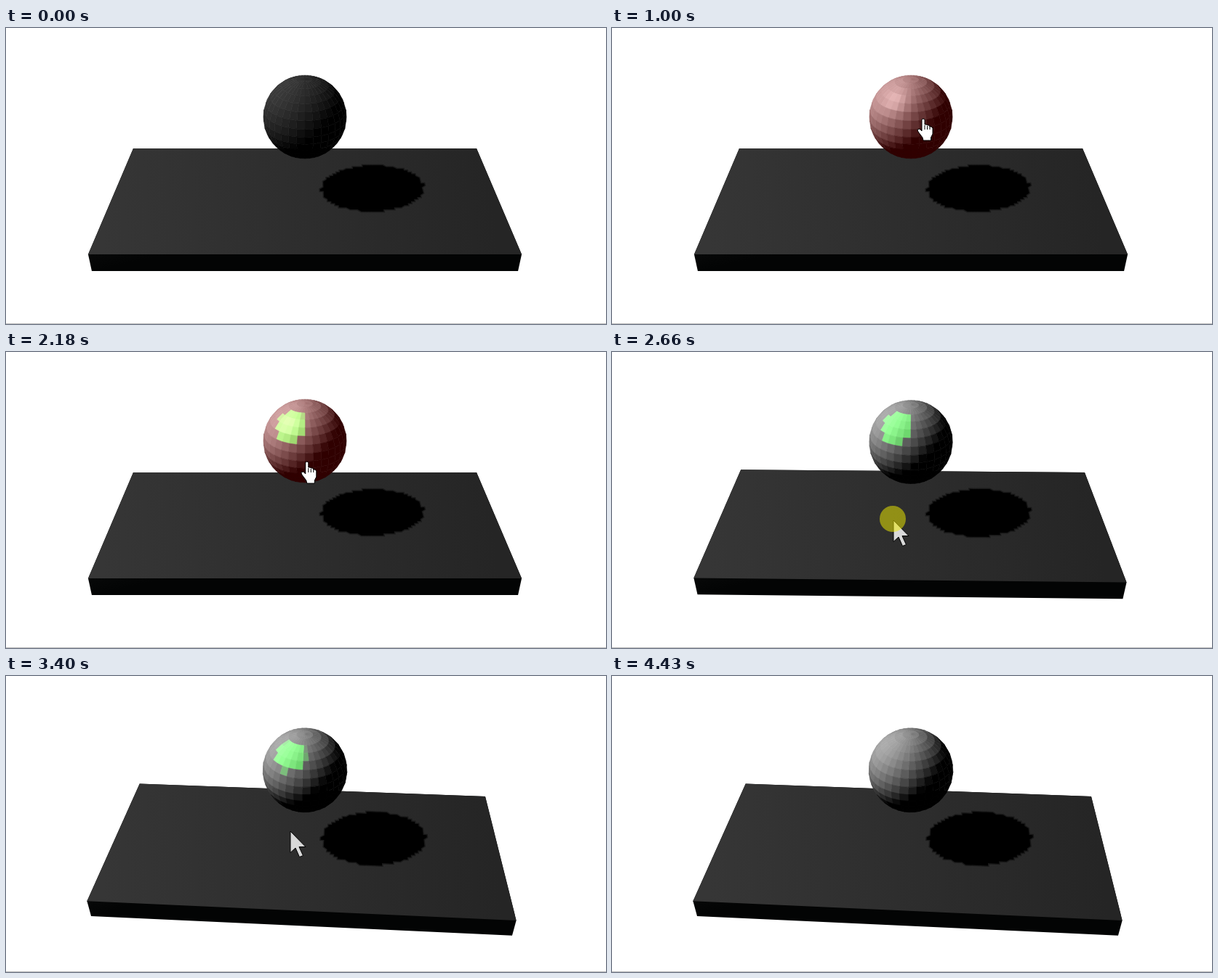
Write an HTML page with a canvas that moves like this. It is 825x408 px and loops after 4.97 s.

```html
<!DOCTYPE html>
<html lang="en">
<head>
<meta charset="utf-8">
<title>Sphere and slab</title>
<style>
  html, body { margin: 0; width: 100%; height: 100%; overflow: hidden; background: #fff; }
  canvas { display: block; }
</style>
</head>
<body>
<canvas id="stage" width="825" height="408"></canvas>
<script>
const ctx = document.getElementById('stage').getContext('2d');
const LOOP = 4970, RAD = Math.PI / 180;

// Scene, in units of one pixel at the view plane; the origin is the slab's centre
const slab = { x: 268.3, y: 13.5, z: 131.3 };
const ball = { y: 136.5, r: 54.1 };
const light = unit([-.612, .78, .129]);
const camera = { x: 411, y: 203.5, dist: 938, drop: 38.9, back: 24.6, pitch: 32.3 };

// Script of the pointer: it appears, hovers, clicks, drags the view and leaves
const ENTER = 520, FIRST_OUT = 1240, CLICK = 1860, CLICK_END = 2040;
const DRAG = 2660, RELEASE = 3310, SECOND_OVER = 3500, LEAVE = 4430;
const grab = { x: 390.4, y: 227.4, gain: .26 };
const path = [
  [ENTER, 66, 156], [1000, 428, 125], [FIRST_OUT, 428, 125], [1480, 328, 249], [1720, 415, 133],
  [CLICK_END, 415, 135], [2280, 411, 189], [2520, 396, 217], [DRAG, 387, 232],
  [2985, 351, 257.7], [RELEASE, 376.5, 249], [3390, 391, 214], [3710, 405, 150],
  [4260, 679, 349], [4370, 678, 384]
];

// The picture only changes in steps inside these spans
const spans = [
  [520, 1000], [1240, 1720], [1820, 2280], [2350, 2520],
  [2660, 3160], [3230, 3710], [3780, 4260], [4370, 4430]
];

function stepTime(t) {
  const span = spans.filter(s => t >= s[0]).pop();
  if (!span) return 0;
  const [a, b] = span, count = Math.round((b - a) / 82), step = (b - a) / count;
  return a + step * Math.min(count, Math.floor((t - a) / step + .25));
}

function pointerAt(q) {
  const i = path.findIndex(k => k[0] >= q);
  if (i < 1) return path[i < 0 ? path.length - 1 : 0].slice(1);
  const [t0, x0, y0] = path[i - 1], [t1, x1, y1] = path[i];
  const u = (q - t0) / (t1 - t0), e = u * u * (3 - 2 * u);
  return [x0 + (x1 - x0) * e, y0 + (y1 - y0) * e];
}

function dot(a, b) { return a[0] * b[0] + a[1] * b[1] + a[2] * b[2]; }
function unit(v) { return v.map(c => c / Math.hypot(...v)); }

// Orbit view: turn() rotates a direction, place() moves a point into view space
function makeView(q) {
  let yaw = 0, pitch = camera.pitch;
  if (q >= DRAG) {
    const [x, y] = pointerAt(Math.min(q, RELEASE));
    yaw = (grab.x - x) * grab.gain;
    pitch += (y - grab.y) * grab.gain;
  }
  const sy = Math.sin(yaw * RAD), cy = Math.cos(yaw * RAD);
  const sp = Math.sin(pitch * RAD), cp = Math.cos(pitch * RAD);
  const turn = ([x, y, z]) => {
    const depth = x * sy + z * cy;
    return [x * cy - z * sy, y * cp - depth * sp, y * sp + depth * cp];
  };
  const place = p => {
    const [x, y, z] = turn(p);
    return [x, y - camera.drop, z - camera.back];
  };
  const project = p => {
    const [x, y, z] = place(p), s = camera.dist / (camera.dist - z);
    return [camera.x + x * s, camera.y - y * s];
  };
  return { turn, place, project };
}

function trace(pts) {
  ctx.beginPath();
  pts.forEach(p => ctx.lineTo(...p));
  ctx.closePath();
}

function ramp(from, to, a, b) {
  const g = ctx.createLinearGradient(...from, ...to);
  g.addColorStop(0, a);
  g.addColorStop(1, b);
  return g;
}

function drawSlab({ project }) {
  const corner = (i, j, k) => project([i * slab.x, j * slab.y, k * slab.z]);
  const bl = corner(-1, 1, -1), br = corner(1, 1, -1);
  const fr = corner(1, 1, 1), fl = corner(-1, 1, 1);
  const lr = corner(1, -1, 1), ll = corner(-1, -1, 1);
  trace([bl, br, fr, lr, ll, fl]);
  ctx.fillStyle = ramp(fl, ll, '#070808', '#030404');
  ctx.fill();
  trace([bl, br, fr, fl]);
  ctx.fillStyle = ramp(corner(-1, 1, .5), corner(1, 1, -.2), '#363636', '#252525');
  ctx.fill();
}

// The ball's shadow on the slab, snapped to the cells of a coarse shadow map
function drawShadow({ project }) {
  const cell = 5, soft = 4, fall = (ball.y - slab.y) / light[1];
  const flat = Math.hypot(light[0], light[2]);
  const ux = light[0] / flat, uz = light[2] / flat;
  const long = ball.r / light[1] + soft, short = ball.r + soft;
  const snap = v => Math.round(v / cell) * cell;
  const rim = [];
  for (let a = 0; a < 360; a += 3) {
    const p = long * Math.cos(a * RAD), s = short * Math.sin(a * RAD);
    rim.push(project([
      snap(p * ux - s * uz) - light[0] * fall, slab.y, snap(p * uz + s * ux) - light[2] * fall
    ]));
  }
  trace(rim);
  ctx.strokeStyle = 'rgba(0,0,0,.4)';
  ctx.lineWidth = 3;
  ctx.stroke();
  ctx.fillStyle = '#000';
  ctx.fill();
}

function drawBall({ turn, place, project }, mat) {
  const rings = 16, slices = 32, da = Math.PI / rings, db = 2 * Math.PI / slices;
  const l = turn(light);
  const normal = (i, j) => {
    const lat = i * da, lon = j * db;
    return [Math.sin(lat) * Math.sin(lon), Math.cos(lat), Math.sin(lat) * Math.cos(lon)];
  };
  const surface = n => [n[0] * ball.r, n[1] * ball.r + ball.y, n[2] * ball.r];
  ctx.lineWidth = .6;
  for (let i = 0; i < rings; i++) {
    for (let j = 0; j < slices; j++) {
      const mid = normal(i + .5, j + .5), n = turn(mid), at = place(surface(mid));
      const eye = unit([-at[0], -at[1], camera.dist - at[2]]);
      if (dot(n, eye) < 0) continue;
      const lit = Math.max(0, dot(n, l));
      const nh = Math.max(0, dot(n, unit(l.map((c, k) => c + eye[k]))));
      const base = mat.diffuse * lit + mat.shine * nh ** 20;
      const green = mat.green * Math.min(1, Math.max(0, (nh - .915) / .015));
      const rgb = [base + mat.red, base + green, base].map(Math.round);
      ctx.fillStyle = ctx.strokeStyle = `rgb(${rgb})`;
      trace([[0, 0], [0, 1], [1, 1], [1, 0]].map(([u, v]) => project(surface(normal(i + u, j + v)))));
      ctx.fill();
      ctx.stroke();
    }
  }
}

const arrow = new Path2D('M0 0V29.5L7 23L12.5 35.5L17.5 33.5L12 21.5H21Z');
const hand = new Path2D('M-2 1L0 0L2 1V8H4L6 9H8L9 11H11L13 13V21L10.5 26V30H0L-1 26L-7 18L-8 15L-5 14L-2 17Z');
const knuckles = new Path2D('M2 9V15M5.5 10V15M9 11V15');

function drawPointer(x, y, over, pressed) {
  const shape = over ? hand : arrow;
  ctx.save();
  ctx.translate(x, y);
  ctx.fillStyle = over ? '#fff' : '#d9d9d9';
  ctx.strokeStyle = '#000';
  ctx.lineWidth = 1;
  ctx.fill(shape);
  ctx.stroke(shape);
  if (over) ctx.stroke(knuckles);
  if (pressed) {
    ctx.beginPath();
    ctx.arc(-1, -2, 18, 0, 7);
    ctx.fillStyle = 'rgba(238,234,0,.52)';
    ctx.fill();
  }
  ctx.restore();
}

function draw(t) {
  const q = stepTime(t), view = makeView(q);
  const shown = q >= ENTER && q < LEAVE;
  const [x, y] = pointerAt(q), [bx, by] = view.project([0, ball.y, 0]);
  const over = shown && Math.hypot(x - bx, y - by) < 57;
  const pressed = (q > CLICK && q < CLICK_END) || (q >= DRAG && q < RELEASE + 40);
  ctx.fillStyle = '#fff';
  ctx.fillRect(0, 0, 825, 408);
  ctx.fillStyle = '#bebebe';
  ctx.fillRect(0, 407, 825, 1);
  drawSlab(view);
  drawShadow(view);
  drawBall(view, {
    diffuse: over ? 160 : q < FIRST_OUT ? 58 : 172,
    red: over ? 48 : 0,
    shine: over ? 42 : 0,
    green: q > CLICK && q < SECOND_OVER ? 105 : 0
  });
  if (shown) drawPointer(x, y, over, pressed);
}

function tick() {
  draw(performance.now() % LOOP);
  requestAnimationFrame(tick);
}
tick();
</script>
</body>
</html>
```
